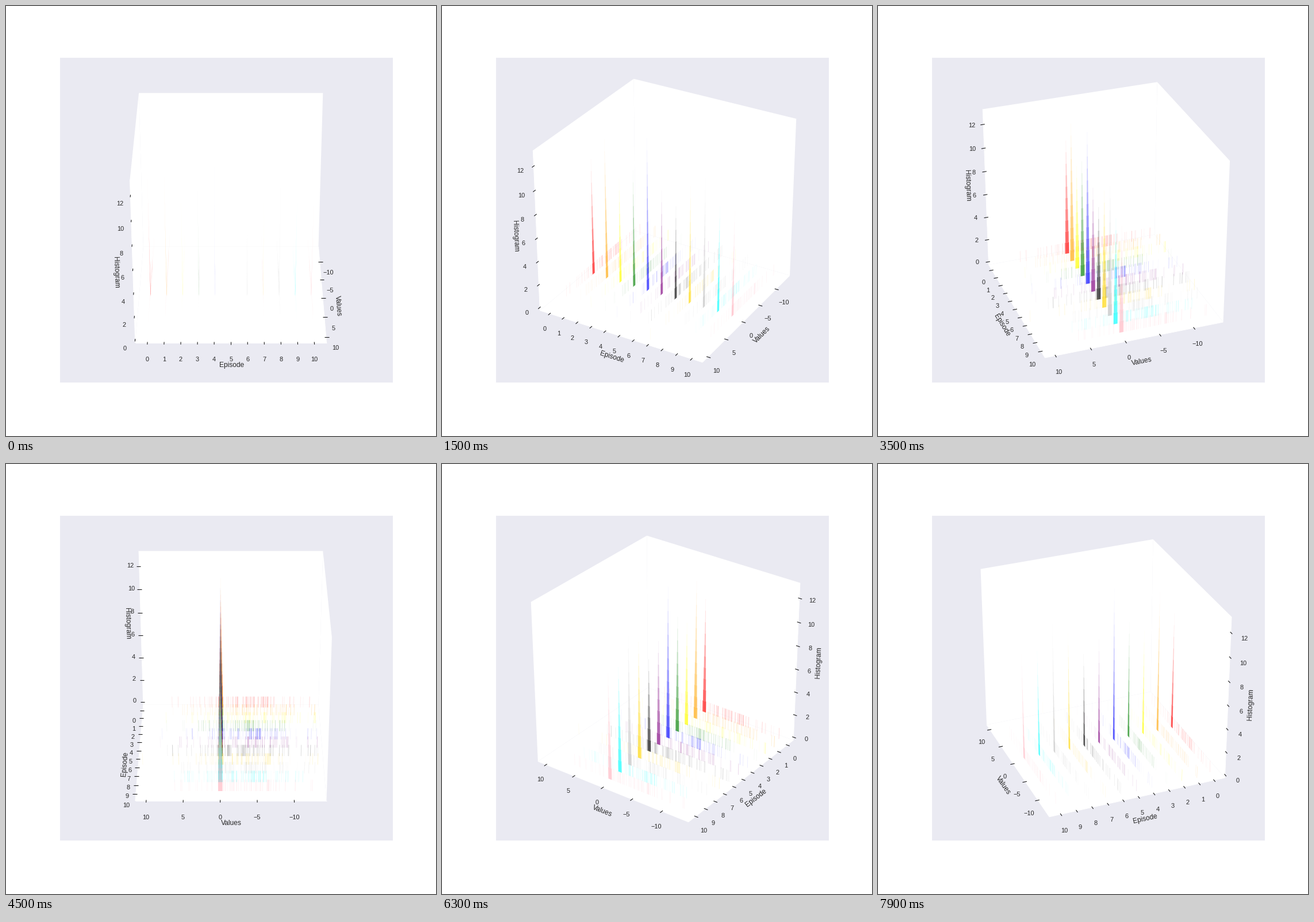
A matplotlib script that plays this animation: 748 px wide and 748 px high, repeating every 8000 ms.

```python
import numpy as np
import matplotlib.pyplot as plt
from matplotlib.animation import FuncAnimation
from matplotlib.collections import LineCollection, PolyCollection
from matplotlib.colors import to_rgb
from matplotlib.transforms import Affine2D

plt.rcParams["font.family"] = "Liberation Sans"

SIZE, DPI = 748, 68
PT = 72 / DPI                       # points per pixel
FRAMES, STEP = 80, 2                # degrees turned per frame
DIST, ELEV = 10, np.radians(30)
LO = np.array([-13.84, -0.5, 0.0])
HI = np.array([10.96, 10.5, 13.0])
DELTA = 1 / 12
EDGE = 0.5 + DELTA / 4              # panes reach a little past the limits
RECT = [0.125, 0.125, 0.775, 0.755]
W, H = RECT[2] * SIZE, RECT[3] * SIZE
PAD = 48 / (W + H) * DELTA
TICK_PAD, NAME_PAD = 15 * PAD, 25 * PAD

COLORS = ["red", "orange", "yellow", "green", "blue", "purple", "black",
          "gold", "silver", "cyan", "lightpink"]
PEAKS = [10, 12, 9, 10, 13, 9, 8, 10, 11, 9, 9]
CLUMPS = [-5.2, -9, -9, -4, -5.5, -9, -2.5, -6.3, -4, -5, -6]

# axis index, tick direction, name, tick values
AXES = [(0, 1, "Values", range(-10, 11, 5)),
        (1, 0, "Episode", range(11)),
        (2, 0, "Histogram", range(0, 13, 2))]


def norm(p):
    """Data coordinates to a unit cube centred on the origin."""
    return (np.asarray(p, float) - LO) / (HI - LO) - 0.5


def project(p, az):
    p = np.asarray(p, float)
    x, y, z = p[..., 0], p[..., 1], p[..., 2]
    c, s = np.cos(az), np.sin(az)
    ahead = x * c + y * s
    depth = DIST - ahead * np.cos(ELEV) - z * np.sin(ELEV)
    right = y * c - x * s
    up = z * np.cos(ELEV) - ahead * np.sin(ELEV)
    return np.stack([right / depth, up / depth], axis=-1)


def bar(x, half, y, z0, z1):
    return [(x - half, y, z0), (x + half, y, z0),
            (x + half, y, z1), (x - half, y, z1)]


def make_bars():
    rng = np.random.default_rng(4)
    quads, fills = [], []
    for y, (name, peak, clump) in enumerate(zip(COLORS, PEAKS, CLUMPS)):
        rgb = to_rgb(name)
        xs = np.r_[rng.normal(-3.2, 4.6, 70), rng.normal(clump, 0.8, 10)]
        for x in np.clip(xs, -13.6, 10.8):
            quads.append(bar(x, 0.038, y, 0, 1))
            top = 0.2 if x < 0 else 0.12
            fills.append((*rgb, rng.uniform(0.02, top)))
        for k in range(peak):
            t = k / peak
            quads.append(bar(0, 0.27 * (1 - t) ** 1.3 + 0.02, y, k, k + 1))
            fills.append((*rgb, 0.66 * (1 - t) ** 1.1))
    return norm(quads), fills


def panes(bx):
    e = EDGE
    return np.array([
        [(bx, -e, -e), (bx, e, -e), (bx, e, e), (bx, -e, e)],
        [(-e, -e, -e), (e, -e, -e), (e, -e, e), (-e, -e, e)],
        [(-e, -e, -e), (e, -e, -e), (e, e, -e), (-e, e, -e)]])


def push(p, i, pad):
    """Move a point outward in every direction but axis i."""
    q = p + np.sign(p) * pad
    q[i] = p[i]
    return q


fig = plt.figure(figsize=(SIZE / DPI, SIZE / DPI), dpi=DPI, facecolor="white")
ax = fig.add_axes(RECT, facecolor="#EAEAF2", xlim=(-0.095, 0.09),
                  ylim=(-0.095, 0.09), xticks=[], yticks=[])
for spine in ax.spines.values():
    spine.set_visible(False)

QUADS, FILLS = make_bars()
walls = PolyCollection([], facecolors="white", edgecolors="none", zorder=1)
rims = LineCollection([], colors="white", linewidths=PT, zorder=2)
bars = PolyCollection([], facecolors=FILLS, edgecolors="none", zorder=3)
ticks = LineCollection([], colors="0.1", linewidths=1.1 * PT, zorder=4)
for art in (walls, rims, bars, ticks):
    ax.add_collection(art, autolim=False)


def label(text, size, va, shift):
    nudge = ax.transData + Affine2D().translate(*shift)
    return ax.text(0, 0, text, size=size * PT, color="0.15", ha="center",
                   va=va, transform=nudge, zorder=5)


names = [label(a[2], 12, "center", (1, -1)) for a in AXES]
numbers = [[label(str(v).replace("-", "\u2212"), 11, "top", (0, -1))
            for v in a[3]] for a in AXES]


def update(frame):
    az = np.radians(frame * STEP)
    bx = -EDGE if np.cos(az) > -1e-9 else EDGE
    starts = [(0, EDGE, -EDGE), (-bx, 0, -EDGE), (-bx, -EDGE, 0)]
    walls.set_verts(project(panes(bx), az))
    bars.set_verts(project(QUADS, az))

    edges, marks = [], []
    for (i, d, _, values), start, name, texts in zip(AXES, starts, names, numbers):
        mid = np.array(start, float)
        ends = np.array([mid, mid])
        ends[:, i] = -EDGE, EDGE
        line = project(ends, az)
        edges.append(line)

        dx, dy = (line[1] - line[0]) * (W, H)
        angle = np.degrees(np.arctan2(dy, dx)) % 180
        name.set_rotation(angle - 180 if angle > 90 else angle)
        name.set_position(project(push(mid, i, NAME_PAD), az))

        for value, text in zip(values, texts):
            p = mid.copy()
            p[i] = (value - LO[i]) / (HI[i] - LO[i]) - 0.5
            mark = np.array([p, p])
            mark[:, d] += np.sign(p[d]) * DELTA * np.array([-0.1, 0.2])
            marks.append(project(mark, az))
            text.set_position(project(push(p, i, TICK_PAD), az))
    rims.set_segments(edges)
    ticks.set_segments(marks)
    return []


anim = FuncAnimation(fig, update, frames=FRAMES, interval=100,
                     repeat=True, repeat_delay=0, blit=False)
plt.show()
```
